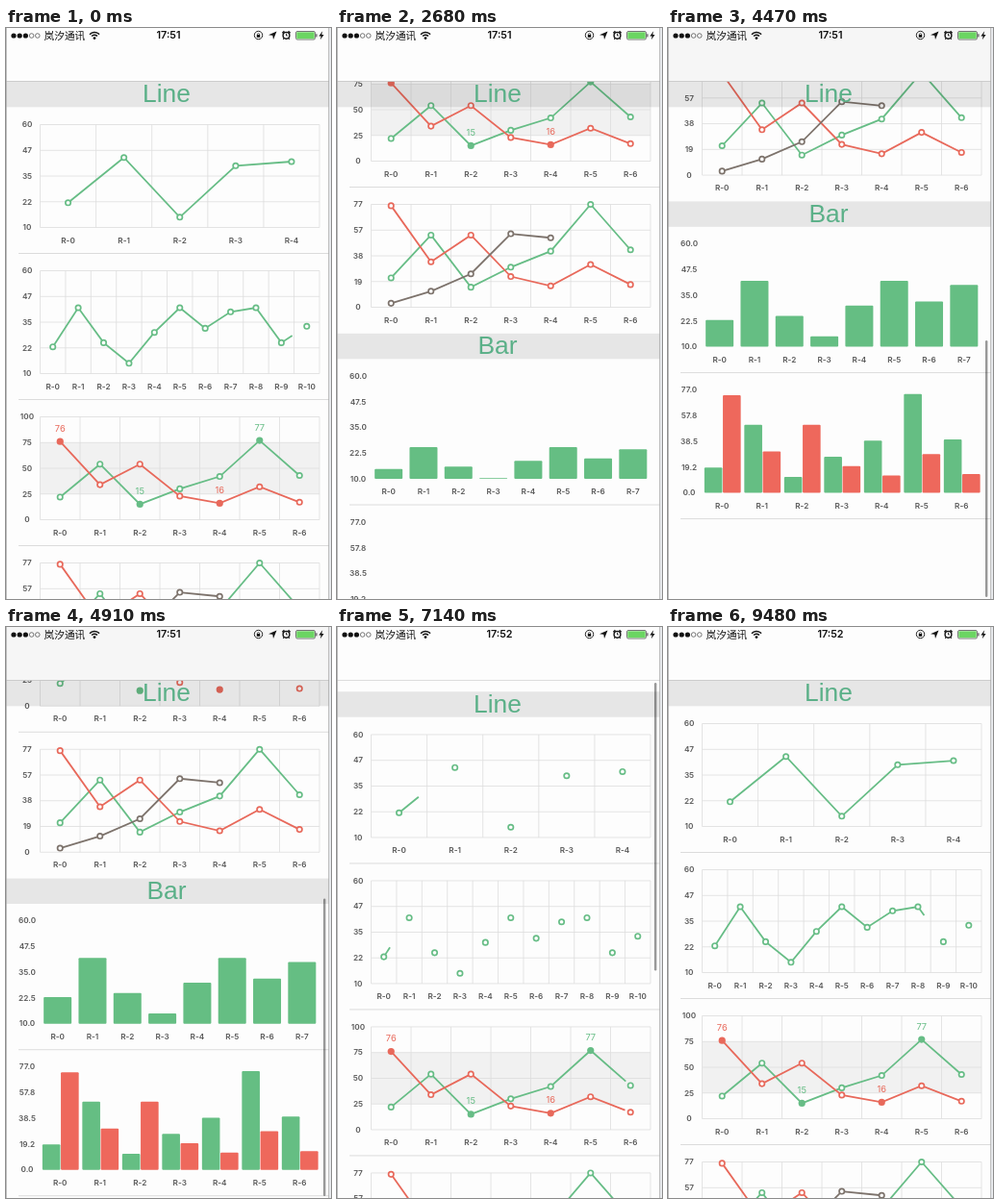
These frames come from a looping animation (338x594 px, 9520 ms). An HTML page with a canvas:

```html
<!DOCTYPE html>
<html lang="zh">
<head>
<meta charset="utf-8">
<title>Charts</title>
<style>
html, body { margin: 0; width: 100%; height: 100%; overflow: hidden; background: #fdfdfd; }
canvas { display: block; width: 338px; height: 594px; }
</style>
</head>
<body>
<canvas id="stage"></canvas>
<script>
const W = 338, H = 594, LOOP = 9520;
const GREEN = '#67bd86', RED = '#e8695b', BROWN = '#7d736c';
const LEFT = 35.5, RIGHT = 326, PLOT_H = 107, ROW_H = 152, NAV = 55.5;
const canvas = document.getElementById('stage');
const ctx = canvas.getContext('2d');
const ratio = window.devicePixelRatio || 1;
canvas.width = W * ratio;
canvas.height = H * ratio;

const clamp = (v, a = 0, b = 1) => Math.min(b, Math.max(a, v));
const easeIn = u => u * u;
const easeOut = u => 1 - (1 - u) ** 2;
const easeOutCubic = u => 1 - (1 - u) ** 3;
const easeBoth = u => (1 - Math.cos(Math.PI * u)) / 2;

// cubic-bezier(.42, 0, .58, 1)
function ease(p) {
  p = clamp(p);
  let lo = 0, hi = 1;
  for (let i = 0; i < 24; i++) {
    const k = (lo + hi) / 2, q = 1 - k;
    if (3 * q * q * k * 0.42 + 3 * q * k * k * 0.58 + k ** 3 < p) lo = k; else hi = k;
  }
  return lo * lo * (3 - 2 * lo);
}

// time, offset, easing towards that offset
const scrollKeys = [
  [0, 0], [1645, 0, easeBoth], [2450, 373, easeBoth], [4040, 373, easeBoth],
  [4180, 404.5, easeIn], [4400, 542, easeOut], [5100, 427, easeOutCubic],
  [6410, 427, easeBoth], [6850, -80, easeOut], [7460, 0, easeOutCubic], [LOOP, 0, easeBoth]
];
function scrollAt(t) {
  const i = scrollKeys.findIndex(k => k[0] > t);
  const [t0, a] = scrollKeys[i - 1], [t1, b, fn] = scrollKeys[i];
  return a + (b - a) * fn((t - t0) / (t1 - t0));
}

const barTimes = [[1650, 2300], [4045, 5150], [6410, 7500]];
const scrollbarAlpha = t => Math.max(...barTimes.map(([a, b]) =>
  t < a ? 0 : clamp(1 - (t - b) / 200)));

const seriesA = [22, 54, 15, 30, 42, 77, 43];
const seriesB = [76, 34, 54, 23, 16, 32, 17];

const lineCharts = [
  { min: 10, max: 60, cols: 5, ticks: [60, 47, 35, 22, 10],
    series: [{ color: GREEN, values: [22, 44, 15, 40, 42] }],
    progress: t => t < 6000 ? 1 : ease((t - 6519) / 3000) },
  { min: 10, max: 60, cols: 11, ticks: [60, 47, 35, 22, 10],
    series: [{ color: GREEN, values: [23, 42, 25, 15, 30, 42, 32, 40, 42, 25, 33] }],
    progress: t => ease(t < 6000 ? (t + 3380) / 4000 : (t - 6640) / 4000) },
  { min: 0, max: 100, cols: 7, ticks: [100, 75, 50, 25, 0], band: true,
    series: [{ color: GREEN, values: seriesA, marked: [2, 5] },
             { color: RED, values: seriesB, marked: [0, 4] }],
    progress: t => t < 4430 ? 1 : ease((t - 4450) / 3000) },
  { min: 0, max: 77, cols: 7, ticks: [77, 57, 38, 19, 0],
    series: [{ color: GREEN, values: seriesA }, { color: RED, values: seriesB },
             { color: BROWN, values: [3, 12, 25, 55, 52] }],
    progress: () => 1 }
];

const barCharts = [
  { min: 10, max: 60, cols: 8, ticks: ['60.0', '47.5', '35.0', '22.5', '10.0'],
    series: [{ color: '#65be83', from: -14.5, width: 29, values: [23, 42, 25, 15, 30, 42, 32, 40] }],
    progress: t => ease((t - 1890) / 1480) },
  { min: 0, max: 77, cols: 7, ticks: ['77.0', '57.8', '38.5', '19.2', '0.0'],
    series: [{ color: '#65be83', from: -18.4, width: 18.6, values: seriesA.map(v => v - 3) },
             { color: '#ee685c', from: 0.8, width: 18.6, values: seriesB.map(v => v - 3) }],
    progress: t => ease((t - 2250) / 1500) }
];

function text(str, x, y, font, color, align = 'center') {
  ctx.font = font;
  ctx.fillStyle = color;
  ctx.textAlign = align;
  ctx.textBaseline = 'middle';
  ctx.fillText(str, x, y);
}

function rect(x, y, w, h, color) {
  ctx.fillStyle = color;
  ctx.fillRect(x, y, w, h);
}

function stroke(points, color, width) {
  ctx.beginPath();
  points.forEach(([x, y]) => ctx.lineTo(x, y));
  ctx.strokeStyle = color;
  ctx.lineWidth = width;
  ctx.stroke();
}

function fillPoly(points, color) {
  ctx.beginPath();
  points.forEach(([x, y]) => ctx.lineTo(x, y));
  ctx.fillStyle = color;
  ctx.fill();
}

function circle(x, y, r, fill, line, width = 1) {
  ctx.beginPath();
  ctx.arc(x, y, r, 0, Math.PI * 2);
  if (fill) { ctx.fillStyle = fill; ctx.fill(); }
  if (line) { ctx.strokeStyle = line; ctx.lineWidth = width; ctx.stroke(); }
}

const colCenter = (chart, i) => LEFT + (i + 0.5) * (RIGHT - LEFT) / chart.cols;
const heightOf = (chart, v) => (v - chart.min) / (chart.max - chart.min) * PLOT_H;

function drawLabels(chart, top) {
  const font = '600 8.2px Inter, sans-serif';
  chart.ticks.forEach((tick, i) => text(tick, 22, top + i * PLOT_H / 4 + 0.3, font, '#5a5a5a'));
  for (let i = 0; i < chart.cols; i++)
    text('R-' + i, colCenter(chart, i), top + PLOT_H + 13.7, font, '#5a5a5a');
}

function drawGrid(chart, top) {
  if (chart.band) rect(LEFT, top + PLOT_H / 4, RIGHT - LEFT, PLOT_H / 2, '#f1f1f1');
  for (let i = 0; i < 5; i++) {
    const y = top + i * PLOT_H / 4;
    stroke([[LEFT, y], [RIGHT, y]], '#dedede', 0.8);
  }
  for (let i = 0; i <= chart.cols; i++) {
    const x = LEFT + i * (RIGHT - LEFT) / chart.cols;
    stroke([[x, top], [x, top + PLOT_H]], '#dedede', 0.8);
  }
}

function drawLineChart(chart, top, t) {
  drawGrid(chart, top);
  drawLabels(chart, top);
  const p = chart.progress(t);
  for (const { color, values, marked = [] } of chart.series) {
    const pts = values.map((v, i) => [colCenter(chart, i), top + PLOT_H - heightOf(chart, v)]);
    const length = pts.slice(1).reduce((sum, [x, y], i) => sum + Math.hypot(x - pts[i][0], y - pts[i][1]), 0);
    if (p > 0) {
      ctx.setLineDash(p < 1 ? [length * p, length * 2] : []);
      stroke(pts, color, 1.8);
      ctx.setLineDash([]);
    }
    pts.forEach(([x, y], i) => {
      if (marked.includes(i)) {
        circle(x, y, 3.6, color);
        text(values[i], x, y - 13.3, '9.3px Inter, sans-serif', color);
      } else {
        circle(x, y, 2.7, '#fdfdfd', color, 1.7);
      }
    });
  }
}

function drawBarChart(chart, top, t) {
  drawLabels(chart, top);
  const p = chart.progress(t), base = top + PLOT_H, hidden = 11.8;
  for (const { color, from, width, values } of chart.series) {
    ctx.fillStyle = color;
    values.forEach((v, i) => {
      const h = p * (heightOf(chart, v) + hidden) - hidden;
      if (h <= 0) return;
      ctx.beginPath();
      ctx.roundRect(colCenter(chart, i) + from, base - h, width, h, Math.min(1, h / 2));
      ctx.fill();
    });
  }
}

function drawHeader(title, y) {
  rect(0, y, 336, 26.5, 'rgba(0,0,0,.09)');
  text(title, 167, y + 14.2, '26.4px "Liberation Sans", Arial, sans-serif', '#5bb088');
}

function drawStatusBar(t) {
  const ink = '#111';
  for (let i = 0; i < 5; i++)
    circle(8 + i * 6.2, 8, i < 3 ? 2.6 : 2.3, i < 3 ? ink : null, i < 3 ? null : '#444', 0.7);
  text('岚汐通讯', 39.5, 8, '10.7px "Noto Sans CJK SC", "Noto Sans CJK", sans-serif', ink, 'left');

  // wifi
  ctx.strokeStyle = ink;
  ctx.lineWidth = 1.5;
  for (const r of [3.8, 6.6]) {
    ctx.beginPath();
    ctx.arc(92, 11, r, -Math.PI * 0.77, -Math.PI * 0.23);
    ctx.stroke();
  }
  circle(92, 10.6, 1.4, ink);

  text(t < 6100 ? '17:51' : '17:52', 169, 8.2, '600 10.8px Inter, sans-serif', ink);

  // rotation lock
  circle(262.5, 7.5, 4.2, null, ink, 0.9);
  rect(260.8, 7, 3.4, 2.8, ink);
  ctx.beginPath();
  ctx.arc(262.5, 6.8, 1.2, Math.PI, 0);
  ctx.lineWidth = 0.7;
  ctx.stroke();

  // location arrow
  fillPoly([[281.5, 3.5], [278, 12], [277.3, 7.8], [273, 7.2]], ink);

  // alarm clock
  circle(291.5, 7.8, 3.4, null, ink, 1.4);
  stroke([[291.5, 5.6], [291.5, 8], [293, 8]], ink, 0.8);
  stroke([[287.4, 5.2], [289.4, 3.3]], ink, 1.3);
  stroke([[293.6, 3.3], [295.6, 5.2]], ink, 1.3);
  stroke([[289.2, 10.5], [288.3, 11.9]], ink, 1);
  stroke([[293.8, 10.5], [294.7, 11.9]], ink, 1);

  // battery
  ctx.beginPath();
  ctx.roundRect(301.5, 3.5, 20, 8.5, 1.5);
  ctx.strokeStyle = '#555';
  ctx.lineWidth = 0.8;
  ctx.stroke();
  rect(302.3, 4.3, 18.4, 6.9, '#6bd562');
  rect(322.3, 6.2, 1.2, 3.2, '#555');
  fillPoly([[329.2, 3.2], [325.4, 8.4], [327.7, 8.4], [326.8, 12.3], [330.6, 6.9], [328.3, 6.9]], ink);
}

function draw(t) {
  const s = scrollAt(t);
  ctx.setTransform(ratio, 0, 0, ratio, 0, 0);
  rect(0, 0, W, H, '#fdfdfd');

  ctx.save();
  ctx.translate(0, -s);
  lineCharts.forEach((chart, i) => {
    drawLineChart(chart, 100.5 + i * ROW_H, t);
    if (i < 3) stroke([[13, 234.5 + i * ROW_H], [336, 234.5 + i * ROW_H]], '#dcdcdc', 1);
  });
  barCharts.forEach((chart, i) => {
    drawBarChart(chart, 735 + i * ROW_H, t);
    stroke([[13, 869 + i * ROW_H], [336, 869 + i * ROW_H]], '#dcdcdc', 1);
  });
  ctx.restore();

  drawHeader('Bar', 690.8 - s);
  drawHeader('Line', Math.max(55.8, 55.8 - s));

  const alpha = scrollbarAlpha(t);
  if (alpha > 0) {
    const top = 58 + Math.max(0, s) * 0.523;
    const bottom = Math.min(592, top + 311 + Math.min(0, s));
    ctx.beginPath();
    ctx.roundRect(330, top, 2.4, bottom - top, 1.2);
    ctx.fillStyle = `rgba(0,0,0,${0.4 * alpha})`;
    ctx.fill();
  }

  const shade = Math.round(253 - 7 * clamp((s - 380) / 25));
  rect(0, 0, 336, NAV, `rgb(${shade},${shade},${shade})`);
  stroke([[0, NAV], [336, NAV]], s < 0 ? '#d6d6d6' : '#c2c2c2', 0.8);
  drawStatusBar(t);

  rect(336, 0, 2, H, '#eceef1');
  stroke([[0.4, 0], [0.4, H]], '#aaa', 0.8);
  stroke([[335.7, 0], [335.7, H]], '#a4a4a4', 0.8);
}

const start = performance.now();
function tick() {
  draw((performance.now() - start) % LOOP);
  requestAnimationFrame(tick);
}
tick();
</script>
</body>
</html>
```
